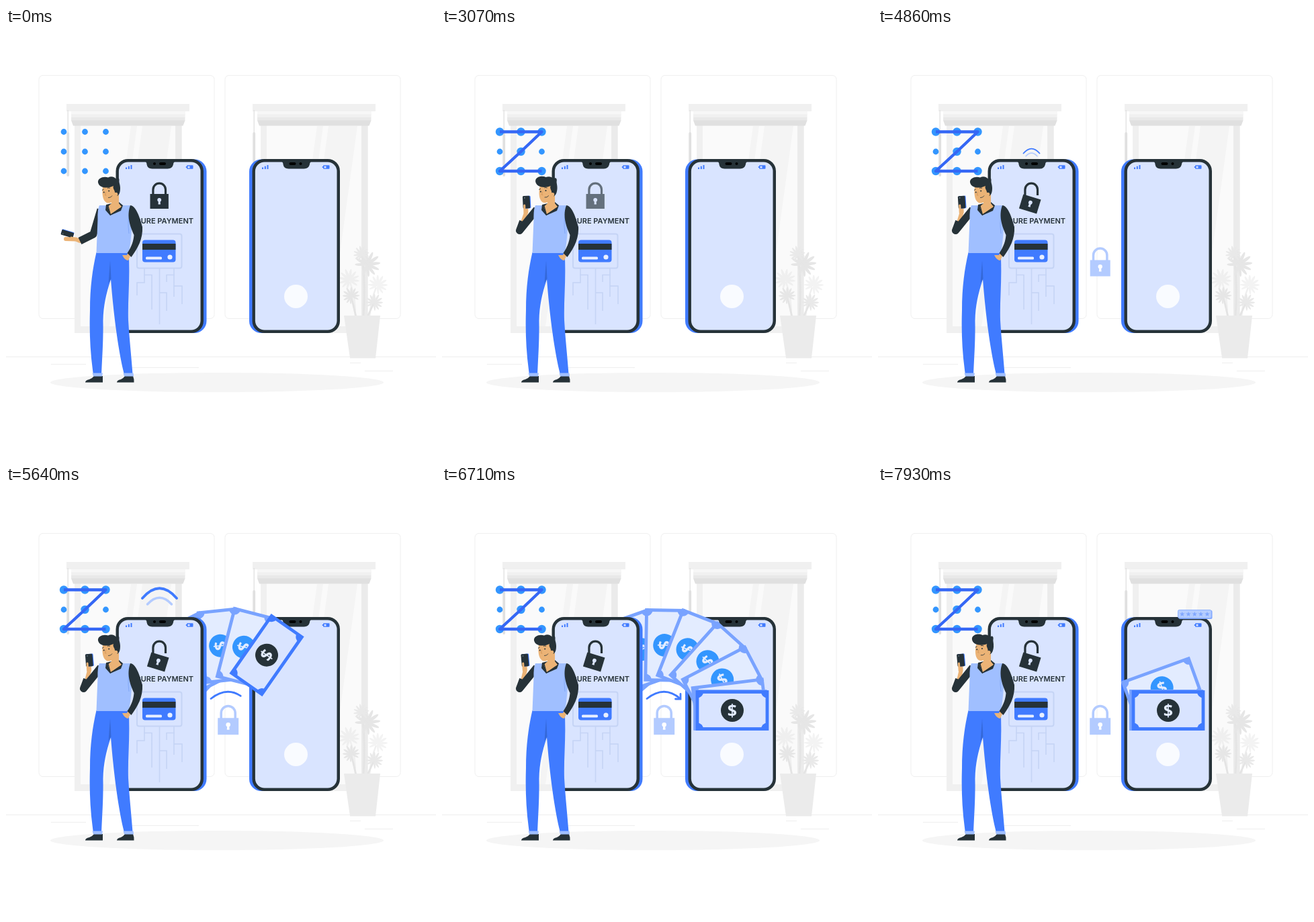
An HTML page for the animation above (8000 ms loop, 640x640 px).

```html
<!DOCTYPE html>
<html lang="en">
<head>
<meta charset="utf-8">
<title>Secure payment</title>
<style>
html, body { margin: 0; width: 100%; height: 100%; overflow: hidden; background: #fff; }
svg { display: block; width: 100%; height: 100%; }
</style>
</head>
<body>
<svg id="stage" viewBox="0 0 640 640"></svg>
<script>
const LOOP = 8000, BLUE = '#407bff', DARK = '#263238', SKIN = '#ebb376', PALE = '#d9e4ff';

const clamp = (v, lo = 0, hi = 1) => Math.min(hi, Math.max(lo, v));
const lerp = (a, b, k) => a + (b - a) * k;
const smooth = k => k * k * (3 - 2 * k);
const progress = (t, from, to) => clamp((t - from) / (to - from));
const range = (n, fn) => Array.from({ length: n }, (_, i) => fn(i)).join('');

// Eased value from a list of [time, value] keys
function keyed(t, keys) {
  const next = keys.findIndex(k => k[0] > t);
  if (next < 0) return keys[keys.length - 1][1];
  if (next === 0) return keys[0][1];
  const [a, b] = [keys[next - 1], keys[next]];
  return lerp(a[1], b[1], smooth(progress(t, a[0], b[0])));
}

const rect = (x, y, w, h, fill, r = 0) =>
  `<rect x="${x}" y="${y}" width="${w}" height="${h}" rx="${r}" fill="${fill}"/>`;
const circle = (x, y, r, fill, id = '') =>
  `<circle ${id && `id="${id}"`} cx="${x}" cy="${y}" r="${r}" fill="${fill}"/>`;
const path = (d, fill) => `<path d="${d}" fill="${fill}"/>`;
const line = (d, color, width, extra = '') =>
  `<path d="${d}" fill="none" stroke="${color}" stroke-width="${width}" ${extra}/>`;

const windowView = x => `<g transform="translate(${x})">
  <rect x="49" y="70.5" width="261" height="362" rx="6" fill="#fff" stroke="#efefef"/>
  ${rect(102, 124, 159.5, 330, '#f0f0f0')}${rect(252, 124, 9.5, 330, '#ebebeb')}
  ${rect(111, 140, 141, 304, '#fafafa')}
  ${path('M186 146H195L154 444H145ZM203 146H246L205 444H162Z', '#f4f4f4')}
  ${rect(90, 113, 183, 11, '#f0f0f0')}${rect(97, 124, 170, 5, '#f7f7f7')}
  ${rect(97, 128.5, 169.5, 5, '#f0f0f0')}${rect(97, 133, 169.5, 5, '#e9e9e9')}
  ${path('M97 137.5H266.5L263.5 145.5H100Z', '#e0e0e0')}
  ${line('M92.2 122V158', '#e0e0e0', 1.3)}${rect(90.3, 155, 3.8, 66, '#e0e0e0', 1.9)}
</g>`;

const palm = (x, y, r, turn, color) => `<g transform="translate(${x} ${y}) rotate(${turn})">
  ${range(11, i => `<ellipse cx="${r / 2}" rx="${r / 2}" ry="${r / 8.5}" fill="${color}"
    transform="rotate(${i * 29 - 145}) scale(${1 - 0.03 * Math.abs(i - 5)})"/>`)}</g>`;

const plant = `
  ${line('M551 386Q543 405 541 430M512 378Q520 400 520 430', '#efefef', 2.5)}
  ${palm(553, 383, 16, -60, '#f3f3f3')}${palm(511, 375, 17, -110, '#efefef')}
  ${line('M531 344Q535 390 532 430M514 400L521 430M548 408L538 430', '#e4e4e4', 2.8)}
  ${palm(537, 352, 21, -35, '#e6e6e6')}${palm(529, 337, 13, -100, '#e9e9e9')}
  ${palm(514, 399, 14, -120, '#e6e6e6')}${palm(548, 409, 14, -60, '#e9e9e9')}
  ${path('M503 428H557L550 491.5H512Z', '#ebebeb')}`;

function handset(x, backShift, mirrored) {
  const [pill, dot] = mirrored ? [60, 72] : [69.5, 57.5];
  return `<g transform="translate(${x} 195)">
    ${rect(backShift, 0.5, 130.5, 258.5, BLUE, 18)}
    ${rect(0, 0, 130.5, 259, DARK, 18)}${rect(4.4, 4.4, 121.6, 250.2, PALE, 14)}
    ${path('M42 3H90Q85.500 4 85.500 8Q84 14.500 77 14.500H54Q47 14.500 46 8Q46 4 42 3Z', DARK)}
    ${rect(pill - 5, 5, 10, 4, '#000', 2)}${circle(dot, 7, 2, '#000')}
    ${rect(14.5, 12.5, 2, 2.5, BLUE)}${rect(18.3, 10.7, 2, 4.3, BLUE)}${rect(22, 9, 2, 6, BLUE)}
    ${rect(105.5, 9.3, 9.5, 5.5, BLUE, 1)}${rect(104.3, 11, 2, 2, BLUE)}${rect(107, 10.7, 3, 2.8, PALE)}
  </g>`;
}

const shackle = line('M-9.300 2V-6.500a9.300 9.300 0 0 1 18.600 0V2', 'currentColor', 3.2);
const lockBody = hole => rect(-13.7, 0, 27.4, 22, 'currentColor') +
  circle(0, 8.8, 2.9, hole) + path('M-1.200 9H1.200L1.700 15.500H-1.700Z', hole);

const leftScreen = `
  <g id="screenLock" color="${DARK}" transform="translate(228.2 247)">
    ${shackle}<g id="screenLockBody">${lockBody(PALE)}</g></g>
  <text x="279" y="291.300" text-anchor="end" font-family="Inter, sans-serif" font-size="11"
    font-weight="600" fill="${DARK}">SECURE PAYMENT</text>
  <rect x="195" y="306.500" width="66.500" height="51" rx="3" fill="none" stroke="#c5d4f5" stroke-width="2"/>
  ${line('M206 358V379H195V398M206 367.5H217V419M228.5 358V441M228.5 394H239V421M250 358V400' +
    'M250 367.5H239V378M250 384H262V411', '#c5d4f5', 1.6)}
  ${rect(203, 315.5, 49.5, 33, BLUE, 4)}${rect(203, 321, 49.5, 9, DARK)}
  ${rect(208, 340.5, 24, 4, '#e9f0ff', 1.5)}${circle(244, 341, 3.6, '#e9f0ff')}`;

const NOTES = 15, PIVOT = '331 335';
function note(i) {
  const first = i === 0;
  const edge = first ? BLUE : '#79a3ff';
  const corner = (sx, sy) =>
    `<path d="M0 0H9A9 9 0 0 1 0 9Z" fill="${edge}" transform="translate(${sx * 52} ${sy * 27.5}) scale(${-sx} ${-sy})"/>`;
  return `<g id="note${i}"><g transform="translate(${first ? 101 : 98} ${first ? -1 : -1.5})">
    <rect x="-52" y="-27.500" width="104" height="55" fill="${first ? PALE : '#e3ecff'}" stroke="${edge}" stroke-width="4.800"/>
    ${corner(-1, -1)}${corner(1, -1)}${corner(-1, 1)}${corner(1, 1)}
    ${circle(0, 0, 17, first ? DARK : '#3396ff')}
    <text y="8.700" text-anchor="middle" font-family="Open Sans, sans-serif" font-size="25" font-weight="700"
      fill="#e3ecff">$</text></g></g>`;
}

const DOT_X = [86, 117.5, 148.5], DOT_Y = [154.5, 184, 213];
const PATTERN = [[0, 0], [1, 0], [2, 0], [1, 1], [0, 2], [1, 2], [2, 2]];
const points = PATTERN.map(([c, r]) => [DOT_X[c], DOT_Y[r]]);
const reach = [0];
for (let i = 1; i < points.length; i++)
  reach[i] = reach[i - 1] + Math.hypot(points[i][0] - points[i - 1][0], points[i][1] - points[i - 1][1]);
const patternLength = reach[reach.length - 1];

const patternLock = range(9, i =>
  circle(DOT_X[i % 3], DOT_Y[Math.floor(i / 3)], 4.4, '#3396ff', `dot${i % 3}${Math.floor(i / 3)}`)) +
  line('M' + points.join('L'), '#3567f5', 4.4, 'id="stroke" stroke-linejoin="round"');

const head = `<g id="head">
  ${path('M144 236C142 249 145 262 154 260.500C164 258 168 250 168 240L160 231Z', SKIN)}
  ${path('M137 230C136 223 146 220 152 222.500C157 220 162 222 163.500 224.500C166 221 169 223 168.500 227' +
    'C168 230 170 233 170 238C170 244 169 248 165.500 250L162 246C163 242 158 239 160 235C152 239 139 239 137 230Z', DARK)}
  ${circle(163.5, 247.5, 2.8, SKIN)}
  ${circle(145.7, 244.5, 1, DARK)}${circle(153.2, 242.5, 1, DARK)}
  ${line('M143 241.500L145.500 240M151 238.500Q153 237 155 238.500', DARK, 0.9)}
  ${line('M148.500 244L147.500 249L149.500 249', '#cd8f52', 0.7)}
  ${line('M152 252.500Q156 253 158 249.500', DARK, 0.8)}</g>`;

const arm = `
  ${line('', SKIN, 6, 'id="hand" stroke-linecap="round" stroke-linejoin="round"')}
  <g id="device">${rect(-5, -9.3, 11, 18.6, BLUE, 1.5)}${rect(-5.7, -9.3, 10.6, 18.6, DARK, 1.5)}
    ${circle(-2.8, -6.5, 0.8, '#78909c')}</g>
  ${line('', SKIN, 3, 'id="thumb" stroke-linecap="round"')}
  ${line('', DARK, 11, 'id="sleeve" stroke-linejoin="round"')}`;

const person = `
  ${path('M131 518H144V527.500H118Q118 524 124 523Q129 521 131 518ZM177 518H189Q191 523 190.500 527.500H165Q165 524 171 523Q175 521 177 518Z', DARK)}
  ${path('M134.500 334H182.500C185 372 181 405 182 435C184 468 187 492 188.500 516H176C167 480 160 425 156 374' +
    'C149 396 145 412 144.500 436C145 466 143 492 142 516H130C125 482 124 450 125 420C125 385 129 358 134.500 334Z', BLUE)}
  ${path('M155 346L152.500 380L156.500 373Z', '#3468d8')}
  ${path('M128.500 513.500H144L143 518.500H130ZM174.500 513.500H189.500L190 518.500H176Z', '#a0bfff')}
  ${arm}
  ${path('M139 264H186Q190 290 183 335H134.500L136.500 285Q136 270 139 264Z', '#a0bfff')}
  ${line('M186 266Q180 285 183 306', '#7ea6f8', 0.9)}
  ${path('M187 335L182 346Q177 346 173 338L180 338L182 334Z', SKIN)}
  ${path('M185 264C193 264 199 281 203 296C204 314 196 328 186.500 341L180.500 335C187 326 190 316 190.500 308C185 296 179 280 185 264Z', DARK)}
  ${path('M149 263L157 261L168 259L174 264L171 272L155 279L148 271Z', DARK)}
  ${path('M157 253L168 246L168 261L172 266L155.500 277.500L151.500 266L157 261Z', SKIN)}
  ${line('M152 265L155.500 278L172.500 267', DARK, 1.2)}
  ${head}`;

const badge = `<g id="badge">
  ${rect(447.5, 185, 50, 13, '#7fa6ff', 2)}
  <rect x="446.500" y="184.500" width="49.500" height="12" rx="2" fill="#b5cdff" stroke="#8fb2ff"/>
  ${range(5, i => `<text x="${452.7 + i * 9.3}" y="193.800" text-anchor="middle"
    font-family="DejaVu Sans, sans-serif" font-size="10" fill="#7fa6ff">★</text>`)}</g>`;

const stage = document.getElementById('stage');
stage.innerHTML = `
  ${windowView(0)}${windowView(277)}
  ${line('M0 489.500H640M67 500.500H119M188 505.500H287M512 498.500H528M534 510.500H576', '#ededed', 0.9)}
  <ellipse cx="314" cy="527.500" rx="248" ry="14.500" fill="#f5f5f5"/>
  ${plant}${patternLock}
  <g id="waves">
    ${line('M203 167Q228.500 137.500 254 167', BLUE, 3.8, 'stroke-linecap="round"')}
    ${line('M210.500 176Q228.500 156.500 246.500 176', '#b3cbff', 3.5, 'stroke-linecap="round"')}</g>
  ${handset(366.5, -4.5, true)}${circle(431.5, 399.5, 17.5, '#f9fbff')}
  ${badge}
  ${range(NOTES, i => note(NOTES - 1 - i))}
  ${handset(163.5, 4.5, false)}${leftScreen}
  <g id="arrow">
    ${line('M305 316.500Q331 296 354.500 316.500', BLUE, 2.8, 'id="arrowLine" pathLength="1" stroke-linecap="round"')}
    ${line('M355 309.500V317H347.500', BLUE, 2.8, 'id="arrowHead" stroke-linecap="round"')}</g>
  <g id="padlock" color="#b3cbff"><g transform="translate(0 -4.200) scale(1.13)">
    ${shackle}${lockBody('#fff')}</g></g>
  ${person}`;

const parts = {};
stage.querySelectorAll('[id]').forEach(el => parts[el.id] = el);
const set = (id, name, value) => parts[id].setAttribute(name, value);

function drawArm(t) {
  const k = smooth(progress(t, 0, 900));
  const sway = keyed(t, [[900, 0], [1430, 0], [3070, 1.3], [4860, 0.3], [6070, -0.8], [7930, -1.2]]);
  const mix = (x0, y0, x1, y1, s = 0) => [lerp(x0, x1, k) + sway * s, lerp(y0, y1, k)];
  const shoulder = [141, 270];
  const elbow = mix(130, 307, 115.5, 301.5), wrist = mix(110, 317, 120.5, 288);
  const palmEnd = mix(89, 314, 124, 265, 0.9);
  set('sleeve', 'd', `M${shoulder}L${elbow}L${wrist}`);
  set('hand', 'd', `M${wrist}L${mix(104, 314.5, 124.5, 274, 0.7)}L${palmEnd}`);
  set('thumb', 'd', `M${mix(104, 314, 122, 275, 0.7)}L${mix(97, 312, 121.5, 264, 0.9)}`);
  const [x, y] = mix(91.5, 306, 124.7, 259.2, 1);
  set('device', 'transform', `translate(${x} ${y}) rotate(${lerp(-73, -4, k) + sway}) scale(${lerp(0.75, 1, k)} 1)`);
}

function drawPattern(t) {
  const drawn = clamp((t - 1195) * 0.17, 0, patternLength);
  set('stroke', 'stroke-dasharray', `${drawn} 999`);
  set('stroke', 'visibility', drawn > 0 ? 'visible' : 'hidden');
  PATTERN.forEach(([c, r], i) => {
    const hit = 1195 + reach[i] / 0.17;
    set(`dot${c}${r}`, 'r', lerp(4.4, 6.2, smooth(progress(t, hit - 130, hit + 50))));
  });
}

function drawLocks(t) {
  const blinking = t > 930 && t < 4210;
  set('screenLock', 'opacity', blinking ? 0.8 + 0.2 * Math.cos((t - 930) / 820 * 2 * Math.PI) : 1);
  const open = smooth(progress(t, 4210, 4550));
  set('screenLockBody', 'transform', `rotate(${17 * open} -14.200 6.300)`);
  const size = keyed(t, [[4430, 0], [4660, 1.18], [4860, 0.97], [5020, 1]]);
  set('padlock', 'transform', `translate(330.700 349.500) scale(${size})`);
}

function drawNotes(t) {
  const lead = 267 + 0.1407 * (t - 7930);
  for (let i = 0; i < NOTES; i++) {
    const angle = Math.min(0, lead - 20.5 * i);
    set('note' + i, 'transform', `translate(${PIVOT}) rotate(${angle})`);
    set('note' + i, 'visibility', angle > -180 ? 'visible' : 'hidden');
  }
}

function drawSignals(t) {
  const size = progress(t, 4390, 5390);
  set('waves', 'transform', `translate(228.500 203.800) scale(${size}) translate(-228.500 -203.800)`);
  set('waves', 'opacity', 1 - progress(t, 6200, 6500));
  const sweep = smooth(progress(t, 5250, 5750));
  set('arrow', 'opacity', sweep > 0 ? 1 - progress(t, 7000, 7300) : 0);
  set('arrowLine', 'stroke-dasharray', `${sweep} 2`);
  set('arrowHead', 'opacity', progress(t, 5700, 5800));
  set('badge', 'opacity', progress(t, 7750, 7920));
}

function draw(t) {
  drawArm(t);
  drawPattern(t);
  drawLocks(t);
  drawNotes(t);
  drawSignals(t);
  const tilt = keyed(t, [[900, 0], [1430, 2], [2300, 4], [3070, 3.7], [4700, 0], [6750, 0], [7930, 5]]);
  set('head', 'transform', `rotate(${tilt} 160 262)`);
}

const start = performance.now();
function tick() {
  draw((performance.now() - start) % LOOP);
  requestAnimationFrame(tick);
}
tick();
</script>
</body>
</html>
```
